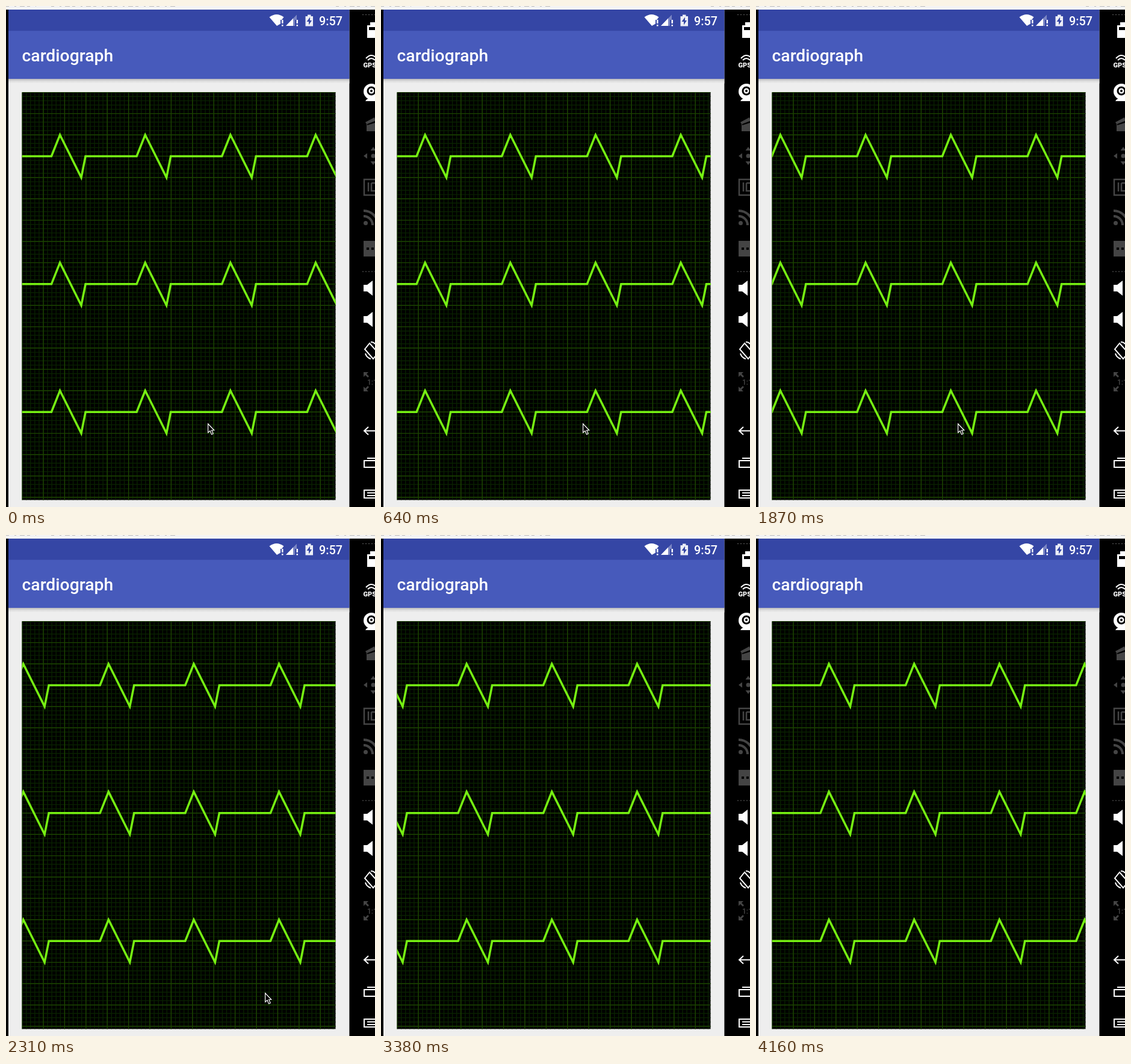
An HTML page that plays this animation: 613 px wide and 832 px high, repeating every 4.23 s.

```html
<!DOCTYPE html>
<html lang="en">
<head>
<meta charset="utf-8">
<title>cardiograph</title>
<style>
html, body { margin: 0; width: 100%; height: 100%; overflow: hidden; background: #000; }
body > svg { display: block; width: 613px; height: 832px; }
text { font-family: Roboto, "Open Sans", sans-serif; font-weight: 500; fill: #fff; }
</style>
</head>
<body>
<svg viewBox="0 0 613 832">
  <defs>
    <linearGradient id="shade" x2="0" y2="1">
      <stop offset="0" stop-color="#b4b4b6"/>
      <stop offset=".5" stop-color="#dcdcdc"/>
      <stop offset="1" stop-color="#eee"/>
    </linearGradient>
    <path id="speaker" d="M594 463h6l9-7v25l-9-7h-6z"/>
  </defs>

  <!-- window edge and app background -->
  <path fill="#f4f4f4" d="M0 0h613v6H0z"/>
  <path stroke="#bbb" stroke-dasharray="5 9 3 6 8 4" d="M0 .5H50M75 .5H285M548 .5H613"/>
  <path fill="#eee" d="M4 6h566.4v826H4z"/>
  <path fill="url(#shade)" d="M4 120.5h566.4v8H4z"/>
  <path fill="#475abb" d="M4 41h566.4v80H4z"/>
  <path fill="#3546a5" d="M4 6h566.4v35.3H4z"/>
  <text x="26.5" y="92" font-size="28.3">cardiograph</text>

  <!-- status bar -->
  <g fill="#fff">
    <path d="M437.5 18.5Q449.500 9.500 461.500 18.500L458 23h-2v6.500L450 33z"/>
    <path d="M458 23h2.500v6h-2.500zM458 31h2.500v2.500h-2.500z"/>
    <path opacity=".35" d="M465 33L483 14.500V23h-3v10z"/>
    <path d="M465 33L477 20.500V33zM482.500 23h2.500v6h-2.500zM482.500 31h2.500v2.500h-2.500z"/>
    <path opacity=".9" d="M497.500 17h3.500v-2.500h5.500V17h3.500v16.500h-12.500z"/>
  </g>
  <path fill="#3546a5" d="M505 18.500L499.500 26h3.500v5.500l5-7.500h-3z"/>
  <text x="520" y="32" font-size="19.8">9:57</text>

  <svg x="26.600" y="143.200" width="521.100" height="677.300" viewBox="0 0 736 956.600" fill="none">
    <path fill="#000" d="M0 0h736v957H0z"/>
    <path id="minor" stroke="#092100" stroke-width="2"/>
    <path id="major" stroke="#1b4200" stroke-width="2"/>
    <path id="wave" stroke="#76f112" stroke-width="5"/>
  </svg>

  <!-- tool strip -->
  <path stroke="#666" stroke-dasharray="2 3" d="M592 14.500h21M592 441h21"/>
  <g fill="#fff">
    <path d="M600 32h5v-5h8v26h-13z"/>
    <text x="593.500" y="102" font-size="11" style="font-weight:900">GPS</text>
    <circle cx="607" cy="142" r="13"/>
    <path d="M597 158q3-5 8-5h8v5z"/>
    <use href="#speaker"/>
    <use href="#speaker" y="52"/>
  </g>
  <path fill="#000" d="M603 35h10v5h-10z"/>
  <circle cx="607" cy="141" r="6" fill="#fff" stroke="#000" stroke-width="3"/>
  <circle cx="607" cy="141" r="2"/>
  <g fill="none" stroke="#fff" stroke-width="2">
    <path d="M598 87q9-10 18 0M601 90q6-6 12 0"/>
    <path d="M596 570l8-10 14 16-8 10zM597 577q2 7 9 9M606 558q5 0 8 4"/>
    <path d="M602 699l-7 6.500 7 6.500M595 705.500h18"/>
    <path d="M613 755h-18v11h18M600 751h13"/>
    <path d="M613 804h-18v13h18M600 808.500h13M600 813h13"/>
  </g>
  <g fill="#444">
    <path d="M597 193l15-8 1 3v20h-14v-12z"/>
    <path d="M594 249l6-4.500v9zM605.500 240l4.500-6 4.500 6zM605.500 258l4.500 6 4.500-6z"/>
    <circle cx="610" cy="249" r="3.500"/>
    <circle cx="597.500" cy="360.500" r="3.500"/>
    <path d="M594 390h19v26h-19z"/>
    <path d="M594 608h8l-3 3 4 4-2 2-4-4-3 3zM594 640h8l-3-3 4-4-2-2-4 4-3-3z"/>
    <text x="600" y="629" font-size="12" style="fill:#444">1:1</text>
  </g>
  <g fill="none" stroke="#444">
    <path stroke-width="2.500" d="M613 288h-18v26h18M602 293v15M607 294v13h6M607 294h6"/>
    <path stroke-width="4" d="M594 349a15 15 0 0 1 15 15M594 340a24 24 0 0 1 24 24"/>
  </g>
  <path d="M599 401h4v4h-4zM607 401h4v4h-4zM600 196l13-5v3l-13 4z"/>

  <path id="cursor" fill="#000" stroke="#fff" stroke-width="1.200" d="M.6.800V15.500L4 12.500l2.600 6 2.600-1.200L6.700 11.500h4z"/>
</svg>
<script>
const LOOP = 4230, STEP = 3.308;
const $ = id => document.getElementById(id);

// Runs of evenly spaced picture changes: first time, last time, count.
const runs = [[0, 0, 1], [90, 560, 6], [640, 1160, 7], [1250, 1690, 6], [1780, 2220, 6],
  [2310, 2760, 6], [2850, 3290, 6], [3380, 3900, 7], [3990, 4160, 3]];
const ticks = runs.flatMap(([from, to, n]) =>
  Array.from({ length: n }, (_, i) => Math.round((from + (to - from) * i / (n - 1 || 1)) / 10) * 10));

function grid(size) {
  let d = '';
  for (let x = 0; x <= 736; x += size) d += `M${x} 0V957`;
  for (let y = 0; y <= 957; y += size) d += `M0 ${y}H736`;
  return d;
}

$('minor').setAttribute('d', grid(10));
$('major').setAttribute('d', grid(50));
$('wave').setAttribute('d', [150, 450, 750].map(y =>
  `M-251 ${y}` + 'h120l20-50 50 100 10-50'.repeat(6)).join(''));

// The pointer rests, then leaves through the bottom edge.
const exit = [[2220, 350, 719], [2310, 430, 760], [2400, 558, 813], [2490, 640, 850]];

function draw() {
  const t = performance.now() % LOOP;
  const tick = ticks.filter(at => at <= t).length - 1;
  const [, x, y] = exit.filter(([at]) => at <= t).pop() || [0, 335, 693];
  $('wave').setAttribute('transform', `translate(${-STEP * tick})`);
  $('cursor').setAttribute('transform', `translate(${x} ${y})`);
  requestAnimationFrame(draw);
}
draw();
</script>
</body>
</html>
```
